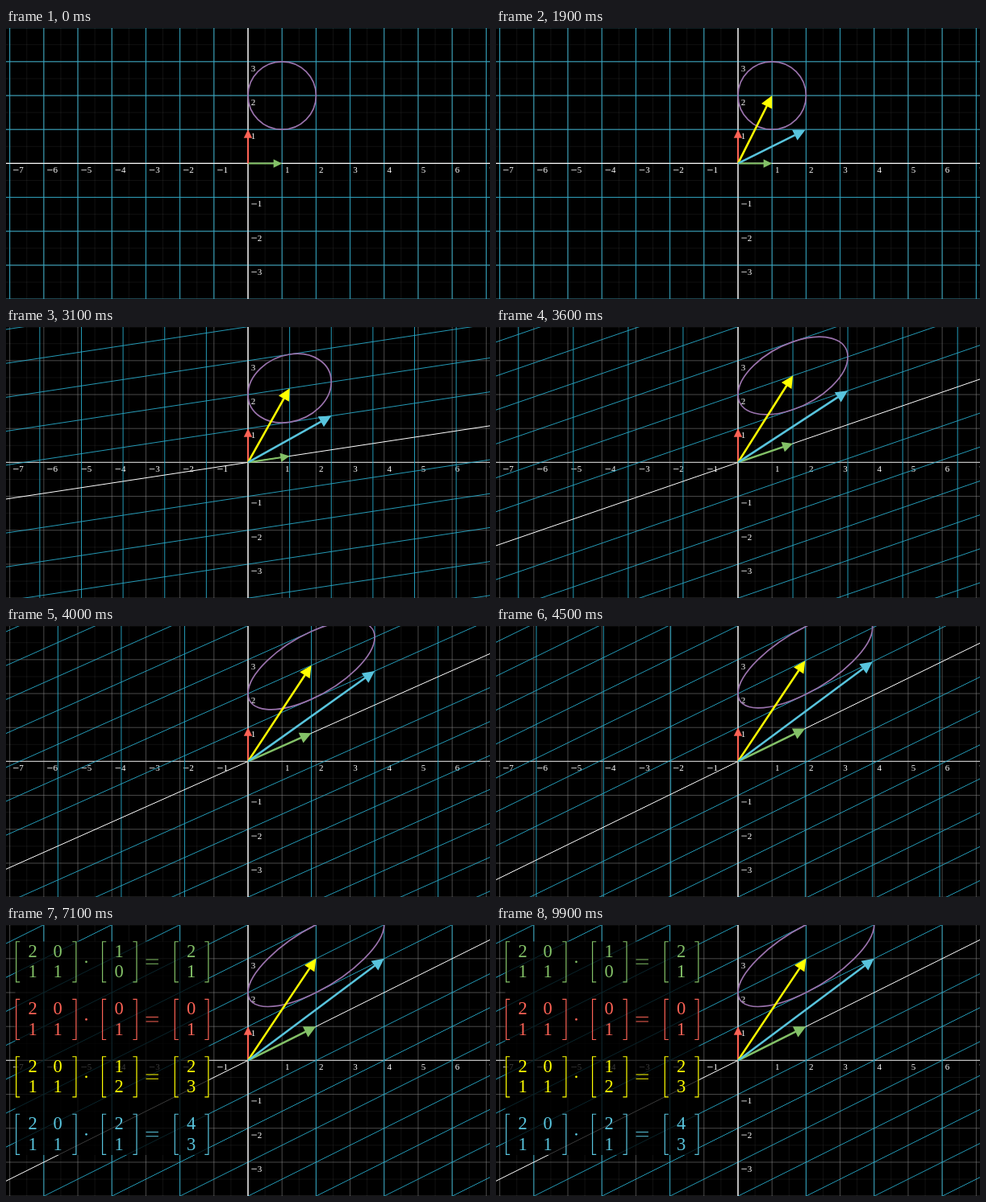
These frames come from a looping animation (600x337 px, 10 s). An HTML page with a canvas:

```html
<!DOCTYPE html>
<html lang="en">
<head>
<meta charset="utf-8">
<title>Linear transformation of the plane</title>
<style>
  html, body { margin: 0; width: 100%; height: 100%; overflow: hidden; background: #000; }
  canvas { display: block; width: 600px; height: 337px; }
</style>
</head>
<body>
<canvas id="stage"></canvas>
<script>
const W = 600, H = 337, LOOP = 10000;
const UNIT = 42.19, CX = 300, CY = 168.4;
const GREEN = '#83C167', RED = '#FC6255', YELLOW = '#FFFF00', BLUE = '#58C4DD';
const SERIF = '"Liberation Serif", "Times New Roman", serif';

const canvas = document.getElementById('stage');
const ctx = canvas.getContext('2d');
const dpr = window.devicePixelRatio || 1;
canvas.width = Math.round(W * dpr);
canvas.height = Math.round(H * dpr);

const clamp = v => Math.min(1, Math.max(0, v));
const mix = (a, b, t) => a + (b - a) * t;
const sigmoid = v => 1 / (1 + Math.exp(-v));
const px = x => CX + x * UNIT;
const py = y => CY - y * UNIT;

function smooth(t) {
  const edge = sigmoid(-5);
  return clamp((sigmoid(10 * (t - 0.5)) - edge) / (1 - 2 * edge));
}

// Matrix [[2,0],[1,1]] reached along arcs; returns the image of (1, 0).
const ARC = Math.atan2(1, 2) / 2;
function basis(s) {
  const half = ARC / 2;
  const len = Math.sin(s * half) / Math.sin(half);
  const turn = (s - 1) * half;
  const re = len * Math.cos(turn), im = len * Math.sin(turn);
  return [1 + re - im, re + im];
}

function line(x1, y1, x2, y2, color, width) {
  ctx.strokeStyle = color;
  ctx.lineWidth = width;
  ctx.beginPath();
  ctx.moveTo(px(x1), py(y1));
  ctx.lineTo(px(x2), py(y2));
  ctx.stroke();
}

function label(n, x, y) {
  let left = x + 3.7;
  const mid = y + 8.3;
  if (n < 0) {
    ctx.fillRect(left + 0.6, mid - 0.4, 6.6, 0.8);
    left += 8;
  }
  ctx.fillText(Math.abs(n), left, mid + 3.6);
}

function backPlane() {
  for (let n = -8; n <= 8; n++) {
    const faded = 'rgba(136,136,136,.5)';
    line(n + 0.5, -5, n + 0.5, 5, faded, 0.25);
    line(-8, n + 0.5, 8, n + 0.5, faded, 0.25);
    line(n, -5, n, 5, '#888', 0.55);
    line(-8, n, 8, n, '#888', 0.55);
  }
  line(-8, 0, 8, 0, '#bbb', 1.1);
  line(0, -5, 0, 5, '#bbb', 1.1);

  ctx.fillStyle = '#fff';
  ctx.font = '11px ' + SERIF;
  ctx.textAlign = 'left';
  for (let n = -7; n <= 7; n++) {
    if (!n) continue;
    label(n, px(n), CY);
    if (Math.abs(n) < 4) label(n, CX, py(n));
  }
}

function movingPlane([a, b]) {
  const slope = b / a;
  for (let n = -9; n <= 9; n++) {
    if (!n) continue;
    line(n * a, -6, n * a, 6, '#29ABCA', 0.9);
    line(-8, n - 8 * slope, 8, n + 8 * slope, '#29ABCA', 0.9);
  }
  line(-8, -8 * slope, 8, 8 * slope, '#fff', 1);
  line(0, -5, 0, 5, '#fff', 1);
}

function circle([a, b]) {
  ctx.save();
  ctx.beginPath();
  ctx.transform(a * UNIT, -b * UNIT, 0, -UNIT, CX, CY);
  ctx.arc(1, 2, 1, 0, 2 * Math.PI);
  ctx.restore();
  ctx.strokeStyle = '#9A72AC';
  ctx.lineWidth = 1.7;
  ctx.stroke();
}

const tipSize = len => Math.min(0.35, 0.25 * len);
const shaftSize = len => Math.min(6, 5 * len);

function arrow(x, y, [a, b], s, grow, color) {
  if (grow <= 0.001) return;
  const from = Math.hypot(x, y), to = Math.hypot(2 * x, x + y);
  const tip = mix(tipSize(from), tipSize(to), s) * UNIT * grow;
  const width = mix(shaftSize(from), shaftSize(to), s) * UNIT / 100;
  const dx = x * a * UNIT * grow, dy = -(y + x * b) * UNIT * grow;
  const len = Math.hypot(dx, dy);
  ctx.save();
  ctx.translate(CX, CY);
  ctx.rotate(Math.atan2(dy, dx));
  ctx.strokeStyle = ctx.fillStyle = color;
  ctx.lineWidth = width;
  ctx.beginPath();
  ctx.moveTo(0, 0);
  ctx.lineTo(len - tip + 0.3, 0);
  ctx.stroke();
  ctx.beginPath();
  ctx.moveTo(len, 0);
  ctx.lineTo(len - tip, tip / 2);
  ctx.lineTo(len - tip, -tip / 2);
  ctx.fill();
  ctx.restore();
}

// Equation glyphs, listed in writing order.
const glyphs = [];

function bracket(x, y, dir, color) {
  const path = new Path2D(), h = 25.6, t = 1.2 * dir, foot = 5.2 * dir;
  const pts = [[foot, h], [0, h], [0, -h], [foot, -h], [foot, 1.1 - h], [t, 1.1 - h], [t, h - 1.1], [foot, h - 1.1]];
  pts.forEach(([u, v]) => path.lineTo(x + u, y + v));
  path.closePath();
  glyphs.push({ path, color, size: 124 });
}

function matrix(left, right, y, rows, color) {
  rows.forEach((row, r) => row.forEach((n, c) =>
    glyphs.push({ text: n, x: left + 21 + c * 31, y: y + (r ? 19.2 : -6.2), color, size: 80 })));
  bracket(left, y, 1, color);
  bracket(right, y, -1, color);
}

function equation(y, [p, q], color) {
  matrix(12, 87.5, y, [[2, 0], [1, 1]], color);
  const dot = new Path2D();
  dot.arc(99.5, y, 1.35, 0, 2 * Math.PI);
  glyphs.push({ path: dot, color, size: 9 });
  matrix(119, 162.6, y, [[p], [q]], color);
  const equals = new Path2D();
  equals.rect(173.5, y - 3.3, 15.4, 1);
  equals.rect(173.5, y + 2, 15.4, 1);
  glyphs.push({ path: equals, color, size: 33 });
  matrix(208.7, 251.5, y, [[2 * p], [p + q]], color);
}

equation(45.8, [1, 0], GREEN);
equation(117.4, [0, 1], RED);
equation(188.8, [1, 2], YELLOW);
equation(260.3, [2, 1], BLUE);

function drawGlyph(g, a) {
  if (a <= 0) return;
  const border = clamp(a * 2), fill = clamp(a * 2 - 1);
  ctx.strokeStyle = ctx.fillStyle = g.color;
  if (fill < 1) {
    ctx.lineWidth = 0.85 * (1 - fill);
    ctx.setLineDash(border < 1 ? [g.size * border, g.size] : []);
    if (g.path) ctx.stroke(g.path);
    else ctx.strokeText(g.text, g.x, g.y);
    ctx.setLineDash([]);
  }
  if (fill > 0) {
    ctx.globalAlpha = fill;
    if (g.path) ctx.fill(g.path);
    else ctx.fillText(g.text, g.x, g.y);
    ctx.globalAlpha = 1;
  }
}

function equations(t) {
  if (t < 5000) return;
  const count = glyphs.length, lag = 4 / (count + 2);
  const pos = clamp((t - 5000) / 2000) * (1 + lag * count);
  ctx.fillStyle = `rgba(0,0,0,${0.77 * clamp(pos * 2 - 1)})`;
  ctx.fillRect(11.5, 20.5, 240, 265.5);
  ctx.font = '22.5px ' + SERIF;
  ctx.textAlign = 'center';
  glyphs.forEach((g, i) => drawGlyph(g, pos - lag * (i + 1)));
}

function draw(t) {
  ctx.setTransform(dpr, 0, 0, dpr, 0, 0);
  ctx.fillStyle = '#000';
  ctx.fillRect(0, 0, W, H);
  const s = smooth(clamp((t - 2000) / 3000));
  const m = basis(s);
  backPlane();
  movingPlane(m);
  circle(m);
  arrow(1, 0, m, s, 1, GREEN);
  arrow(0, 1, m, s, 1, RED);
  arrow(1, 2, m, s, smooth(clamp(t / 1000)), YELLOW);
  arrow(2, 1, m, s, smooth(clamp((t - 1000) / 1000)), BLUE);
  equations(t);
}

const start = performance.now();
function frame() {
  draw((performance.now() - start) % LOOP);
  requestAnimationFrame(frame);
}
frame();
</script>
</body>
</html>
```
